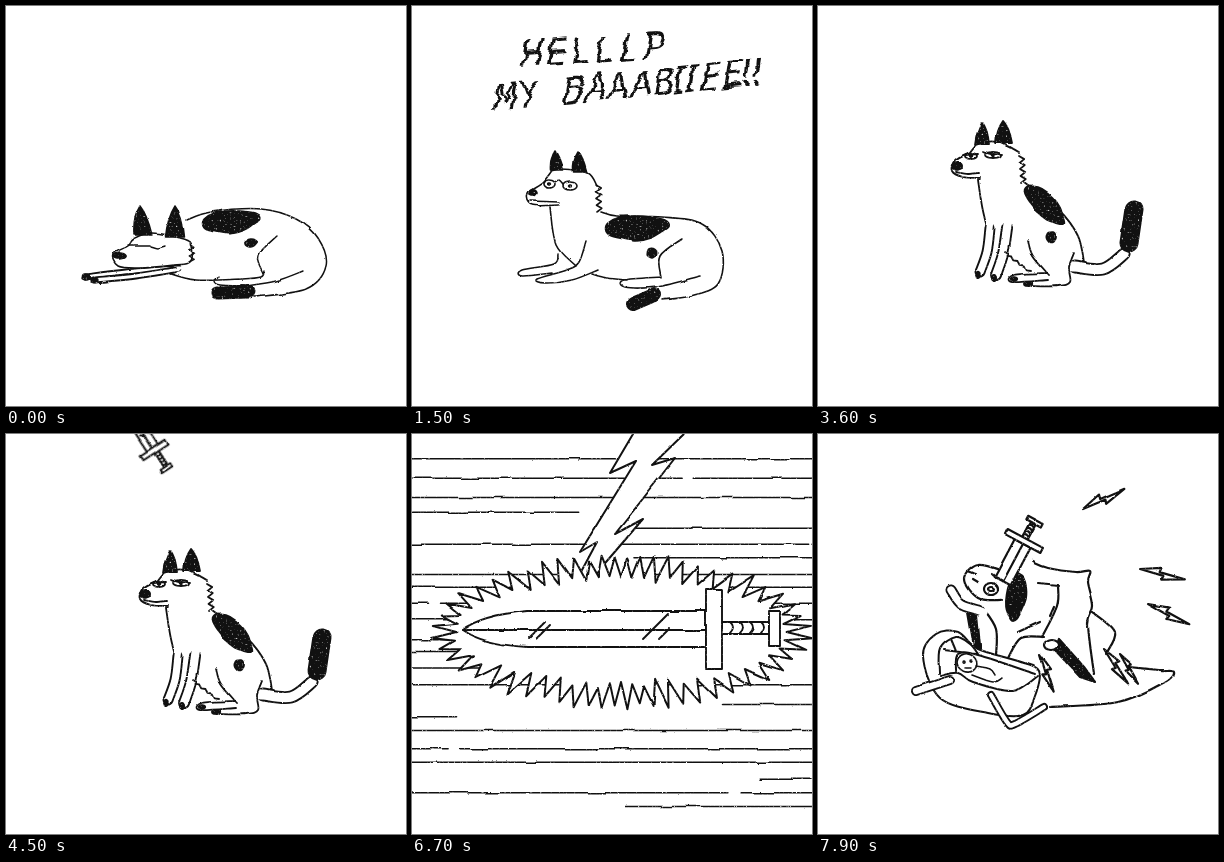
These frames come from a looping animation (400x400 px, 8 s). An HTML page:

```html
<!DOCTYPE html>
<html lang="en">
<head>
<meta charset="utf-8">
<title>Dog and sword</title>
<style>
html, body { margin: 0; width: 100%; height: 100%; overflow: hidden; background: #fff; }
svg { display: block; width: 100vw; height: 100vh; }
path { stroke: #111; stroke-linecap: round; stroke-linejoin: round; fill: none; vector-effect: non-scaling-stroke; }
.white { fill: #fff; }
.black { fill: #111; }
.gap { stroke: #fff; }
text { font: italic 38px "Noto Sans Mono", monospace; fill: #111; }
.thin { font-family: "Noto Sans", sans-serif; }
</style>
</head>
<body>
<svg viewBox="0 0 400 400">
  <defs id="filters"></defs>
  <g id="boil" filter="url(#crayon)"></g>
  <g id="hold" filter="url(#still)"></g>
  <g id="shout" filter="url(#wave)">
    <text transform="translate(107 62) rotate(-4)" letter-spacing="1.6">HELLLP</text>
    <text transform="translate(80 105) rotate(-5.5)">MY BAAAB<tspan class="thin">II</tspan>EE<tspan class="thin">!!</tspan></text>
  </g>
</svg>
<script>
const $ = id => document.getElementById(id);
const rnd = n => { const x = Math.sin(n * 127.1) * 43758.5453; return x - Math.floor(x); };
const points = s => s.split(' ').map(p => p.split(',').map(Number));
const range = (n, f) => Array.from({ length: n }, (_, i) => f(i));

// Smooth path through points
function curve(p, closed) {
  const n = p.length;
  const at = i => closed ? p[(i + n) % n] : p[Math.max(0, Math.min(n - 1, i))];
  return 'M' + p[0] + range(closed ? n : n - 1, i => {
    const [a, b, c, e] = [at(i - 1), at(i), at(i + 1), at(i + 2)];
    const c1 = b.map((v, k) => (v + (c[k] - a[k]) / 6).toFixed(1));
    const c2 = c.map((v, k) => (v - (e[k] - b[k]) / 6).toFixed(1));
    return `C${c1} ${c2} ${c}`;
  }).join('') + (closed ? 'Z' : '');
}

const path = (cls, d, width) => `<path class="${cls}" d="${d}"${width ? ` stroke-width="${width}"` : ''}/>`;
const line = s => path('', s.split(' / ').map(t => curve(points(t))).join(''));
const open = s => path('white', curve(points(s)));
const shape = s => path('white', curve(points(s), true));
const mass = s => path('black', `M${s}Z`);
const thick = (s, width) => path('', curve(points(s)), width);
const box = (x, y, w, h) => path('white', `M${x},${y}h${w}v${h}h${-w}Z`);
const group = (id, width, ...parts) => `<g id="${id}" stroke-width="${width}">${parts.join('')}</g>`;
const place = (transform, ...parts) => `<g transform="${transform}">${parts.join('')}</g>`;

// Slightly uneven ellipse
function spot(x, y, rx, ry, turn = 0, cls = 'black') {
  const c = Math.cos(turn), s = Math.sin(turn);
  return path(cls, curve(range(12, i => {
    const a = i * Math.PI / 6, r = cls === 'black' ? .92 + .2 * rnd(x + i) : 1;
    const u = rx * r * Math.cos(a), v = ry * r * Math.sin(a);
    return [x + u * c - v * s, y + u * s + v * c];
  }), true));
}
const eye = (x, y, w, h, turn) => spot(x, y, w, h, turn, 'white') + spot(x, y, 1.3, 1);
const ear = (x, y, w, h, lean) =>
  path('black', `M${x - w / 2},${y}Q${x + lean - w * .4},${y - h * .6} ${x + lean},${y - h}Q${x + w * .4 + lean},${y - h * .7} ${x + w / 2},${y}Z`);

// Zigzag fur, teeth to the left-hand side of travel
function fur(x1, y1, x2, y2, teeth, depth) {
  const dx = x2 - x1, dy = y2 - y1, len = Math.hypot(dx, dy);
  return path('', 'M' + range(teeth * 2 + 1, i => {
    const t = i / teeth / 2, k = i % 2 * depth / len;
    return [x1 + dx * t + dy * k, y1 + dy * t - dx * k];
  }).join('L'));
}

// Outlined tube; an attached one is left open where it starts
function limb(s, w, attached = true) {
  const p = points(s), [a, b] = p, len = Math.hypot(a[0] - b[0], a[1] - b[1]);
  const root = a.map((v, k) => v + (v - b[k]) / len * (w / 2 + 1));
  return path('', curve(p), w) + path('gap', curve(attached ? [root, ...p] : p), w - 3.8);
}

const bolt = (x, y, len, angle) =>
  place(`translate(${x} ${y}) rotate(${angle}) scale(${len})`, path('white', 'M0,0L.45,-.13 .43,-.03 1,0 .5,.12 .53,.03Z'));

// Guard at 0,0 and blade to the left
function sword(length, tip) {
  const glint = (x, h) => path('', `M${x},${10}L${x + h},${10 - h}`);
  return path('white', `M-8,-18H${tip - length}Q${-length + tip * .3},-14 ${-length},1Q${-length + tip * .3},15 ${tip - length},18H-8Z`)
    + path('', `M${-length},1H-8`)
    + (tip ? glint(-186, 17) + glint(-178, 14) + glint(-71, 25) + glint(-55, 11) : '')
    + box(8, -7, 47, 12)
    + range(4, i => path('', `M${16 + i * 10},-7q6,5 0,11`)).join('')
    + box(-8, -40, 16, 80) + box(55, -18, 11, 35);
}

function makeFilter(id, freq, scale) {
  return `<filter id="${id}" filterUnits="userSpaceOnUse" x="0" y="0" width="400" height="400" color-interpolation-filters="sRGB">
    <feTurbulence type="fractalNoise" baseFrequency="${freq}" numOctaves="2" seed="2" result="slow"/>
    <feDisplacementMap in="SourceGraphic" in2="slow" scale="${scale}" xChannelSelector="R" yChannelSelector="G" result="bent"/>
    <feTurbulence type="fractalNoise" baseFrequency=".5" numOctaves="2" seed="5" result="fine"/>
    <feDisplacementMap in="bent" in2="fine" scale="2" xChannelSelector="R" yChannelSelector="G" result="rough"/>
    <feColorMatrix in="fine" values="0 0 0 0 0  0 0 0 0 0  0 0 0 0 0  0 0 4 0 -.4" result="grain"/>
    <feComposite in="rough" in2="grain" operator="in"/>
  </filter>`;
}
$('filters').innerHTML = makeFilter('crayon', '.03', 3) + makeFilter('still', '.03', 2) + makeFilter('wave', '.02 .09', 10);

const nap = group('nap', 1.5,
  line('181,214 205,206 255,203 290,213 312,232 320,260 300,283 248,291 / 240,280 270,275 297,265'),
  line('162,267 190,274 235,273 255,271 258,265 / 240,280 214,279 208,275 213,270 / 271,230 252,250 257,268'),
  thick('211,287 243,286', 13),
  spot(224, 216, 28, 11, -.1), spot(245, 237, 6, 3.5, -.2),
  limb('172,262 120,266 79,271', 7), limb('168,264 130,270 88,274', 7),
  spot(79, 271, 4, 3), spot(88, 274, 4, 2.5),
  shape('121,240 127,233 146,227 178,233 186,240 184,256 168,259 133,262 112,260 107,248'),
  fur(184, 238, 183, 256, 3, 5),
  ear(137, 229, 18, 29, -3), ear(169, 231, 19, 31, 0),
  spot(113, 250, 6, 3),
  line('121,239 144,239 / 145,240 152,242 159,240'));

const wake = group('wake', 1.6,
  line('189,206 205,210 250,211 290,218 310,245 306,278 278,290 250,294 / 138,201 144,238 164,260'),
  line('174,235 167,256 155,264 125,273 133,277 160,274 186,264 / 146,248 142,258 110,264 110,270 140,267'),
  line('180,268 195,272 215,274 / 249,271 212,274 213,281 245,281 288,270 / 270,233 248,250 249,272'),
  thick('221,298 242,289', 14),
  spot(224, 222, 31, 12, -.05), spot(240, 247, 5, 4.5),
  line('139,165 150,163 175,167 184,180 / 139,166 130,177 115,188 120,199 147,199 / 118,195 147,196'),
  fur(183, 179, 185, 206, 4, 5),
  ear(145, 164, 13, 20, -2), ear(168, 166, 13, 20, -2),
  spot(120, 187, 4, 3),
  eye(137, 178, 6, 4), eye(158, 179, 7, 4), line('143,176 147,174 151,178'));

// Hind part shared by both upright poses
const rump = (tip, patch) =>
  line('206,177 240,203 260,230 266,257') + limb('257,261 285,263 306,248', 13) + thick(tip, 19) + patch
  + spot(233, 231, 5, 5) + line('256,248 251,262 252,276 240,280 210,280 / 230,267 196,269 194,276 230,274')
  + spot(196, 273, 3, 2) + spot(210, 278, 4, 2);

const sit = group('sit', 1.8,
  rump('311,237 316,203', spot(227, 199, 25, 10, .78)),
  line('160,173 164,200 169,222 / 210,235 215,250 231,269'),
  limb('172,222 169,246 162,266', 11), limb('189,222 185,248 178,269', 12),
  spot(160, 269, 2, 3), spot(176, 272, 2, 3),
  fur(213, 264, 188, 246, 4, 2),
  line('152,146 160,138 180,136 201,146 / 152,146 137,154 134,165 145,171 162,172 / 138,166 150,168 161,167'),
  fur(201, 149, 203, 177, 4, 5),
  ear(164, 138, 14, 22, 0), ear(186, 137, 16, 22, -1),
  spot(139, 160, 5, 4), eye(153, 150, 6, 3), eye(175, 150, 8, 3),
  line('147,149 160,148 / 165,146 173,149 184,149'));

const paw = group('paw', 1.8,
  rump('309,238 318,206', spot(226, 202, 20, 11, .9)),
  line('161,177 159,186 168,203 / 187,232 210,260 231,271 / 222,238 217,250 226,262'),
  limb('182,224 170,250 158,271', 11), spot(157, 273, 4, 2),
  limb('195,207 160,213 143,222', 11),
  line('152,146 160,140 177,138 204,148 / 152,146 142,157 152,170 175,175 / 155,172 165,176 175,171'),
  fur(203, 148, 203, 175, 4, 5),
  ear(171, 139, 13, 18, 3), ear(190, 142, 17, 21, 11),
  spot(154, 168, 4, 3), eye(156, 150, 6, 3), eye(173, 151, 7, 3),
  line('150,149 162,149 / 164,146 171,149 181,149'));

const witch = group('witch', 2.2,
  line('203,130 213,123 228,122 237,130 / 270,165 287,167 300,190 294,213 276,228'),
  line('190,222 192,212 203,206 218,207 / 231,223 229,235 237,248 / 292,212 295,224 289,235 / 296,226 307,231 296,239'),
  line('303,232 322,230 347,235 366,242 336,262 310,270 230,273 / 182,188 185,198 193,205 / 210,188 223,182'),
  spot(206, 156, 30, 14, -1.1),
  open('235,131 298,117 293,134 266,175 246,221 238,180 241,155'),
  mass('241,154 251,148 249,175 241,208 238,180'),
  line('251,150 268,151 284,151 / 291,120 298,123'),
  limb('242,170 230,176 220,180', 8),
  open('160,153 147,161 155,185 165,211 183,188'),
  mass('147,161 159,153 162,172 167,190 165,211'),
  limb('158,179 148,173 141,170', 7),
  shape('163,152 166,131 182,125 202,136 196,156 187,176 172,178'),
  fur(167, 130, 197, 124, 6, 6),
  line('164,144 174,149 / 183,152 190,146 199,145 / 170,172 179,166 187,164'),
  eye(171, 152, 6, 3, .2), eye(191, 150, 7, 3, -.3),
  spot(182, 161, 4, 2, 0, 'white'),
  limb('183,171 174,185', 7, false));

const stab = group('stab', 2.2,
  line('215,128 230,134 258,138 272,137 270,148 275,172 270,190 276,240 / 275,178 297,198 288,220'),
  line('240,150 239,172 224,203 / 220,149 241,151 / 190,224 203,204 226,203 / 200,198 222,188 / 232,182 236,173'),
  line('312,233 341,236 356,237 345,249 300,268 232,273 / 165,174 178,195 178,222 / 162,222 188,224'),
  spot(198, 162, 24, 9, -1.4),
  mass('241,205 266,233 277,248 262,243 237,216'), spot(234, 211, 7, 5, 0, 'white'),
  mass('150,178 159,182 163,222 157,218'),
  limb('160,176 143,170 133,156', 11),
  open('184,166 160,164 147,145 160,131 188,138'),
  line('150,137 158,140 / 155,145 160,148 / 174,140 178,144'),
  place('translate(206 107) rotate(-62) scale(.36 .5)', sword(126, 0)),
  spot(173, 155, 7, 6, 0, 'white'), spot(173, 155, 3, 2, 0, 'white'),
  bolt(222, 220, 40, 70), bolt(286, 215, 42, 55), bolt(302, 220, 34, 58),
  range(3, i => `<g class="spark"></g>`).join(''));

const flight = group('flight', 2,
  '<path id="speed" stroke-width="1.5"/>',
  `<g id="lightning">${path('white', 'M221,0 198,39 224,27 168,118 185,108 163,149H176L231,85 203,100 263,24 240,31 272,0')}</g>`,
  '<path id="spikes" class="white"/>');

$('boil').innerHTML = nap + wake + sit + paw + witch + stab + flight + group('sword', 1.9, sword(252, 65));

$('hold').innerHTML = group('cradle', 2,
  shape('105,222 118,200 140,198 160,215 200,227 221,237 217,262 205,281 170,279 122,264'),
  line('121,240 122,215 138,203 152,210 160,220 / 126,216 158,220 / 133,205 138,217 / 138,237 140,220 160,221 217,240'),
  line('122,242 140,239 155,248 195,257 220,242'),
  limb('98,257 132,246', 10, false), limb('173,261 189,288 197,290 226,273', 8, false)) +
  group('asleep', 1.6,
    spot(153, 232, 7, 6, 0, 'white'), spot(152, 229, 5, 3),
    line('158,238 170,235 187,240 / 160,242 186,246 / 166,240 182,243')) +
  group('awake', 1.6,
    spot(149, 229, 10, 9, .4, 'white'), spot(146, 228, 1, 1), spot(153, 227, 1, 1),
    line('147,234 153,234 / 158,232 172,235 177,241 / 154,241 175,248 184,244'));

const cuts = [[0, 'nap'], [8, 'wake'], [22, 'witch'], [33, 'sit'], [48, 'paw'], [60, 'flight'], [71, 'witch'], [75, 'stab']];
const poses = [...new Set(cuts.map(c => c[1]))];

// Guard x, y and angle while the sword drops, is held, thrown and strikes
function swordPose(step) {
  if (step >= 44 && step < 48) return [148, 16 + 63 * (step - 45), 57];
  if (step >= 48 && step < 54) return [143, 212, 57 * (1 - ((step - 48) / 5) ** 2)];
  if (step >= 54 && step < 56) return [143 - 45 * (step - 53) ** 2, 212, 0];
  if (step >= 73 && step < 75) return [206 + 80 * (75 - step), 107 - 25 * (75 - step), -42];
}

function drawFlight(step) {
  const k = step % 3;
  $('speed').setAttribute('d', range(23, i => {
    const y = 24 + i * 15.7 + rnd(i) * 8 + rnd(i + k * 50) * 4;
    const gap = 400 * rnd(i * 7 + k * 31), kind = rnd(i * 5);
    if (kind < .3) return `M0,${y}H400`;
    if (kind < .55) return `M0,${y}H${gap}M${gap + 12},${y}H400`;
    return kind < .8 ? `M${gap},${y}H400` : `M0,${y}H${gap}`;
  }).join(''));
  const n = 112;
  $('spikes').setAttribute('d', 'M' + range(n, i => {
    const t = i / n * 2 * Math.PI, a = t + .2 * Math.sin(2 * t);
    const r = (i % 2 ? 22 : 0) + rnd(i + k * 200) * 8 - 4;
    return [209 + Math.cos(a) * (166 + r), 198 + Math.sin(a) * (53 + r)].map(v => v.toFixed(1));
  }).join('L') + 'Z');
  show('spikes', step >= 65);
  show('lightning', step >= 64);
}

function drawSparks(step) {
  const reach = Math.max(0, (step - 74) / 5);
  document.querySelectorAll('.spark').forEach((el, i) => {
    const x = 215 + (i ? 107 + 8 * (i - 1) : 50) * reach;
    const y = 125 + (i ? 10 + 35 * (i - 1) : -50) * reach;
    el.innerHTML = bolt(x, y, 46, -26 + i * 39 - (i > 1 ? 26 : 0));
  });
}

function show(id, on) { $(id).style.display = on ? '' : 'none'; }

function draw(step) {
  const pose = cuts.filter(c => c[0] <= step).pop()[1];
  poses.forEach(id => show(id, id === pose));
  show('shout', step >= 6 && step < 22);
  show('cradle', pose === 'witch' || pose === 'stab');
  show('asleep', pose === 'witch');
  show('awake', pose === 'stab');

  $('wake').setAttribute('transform', `translate(0 ${-7 * Math.max(0, 10 - step)})`);

  const flying = pose === 'flight', at = swordPose(step);
  show('sword', flying || at);
  if (flying) {
    drawFlight(step);
    $('sword').setAttribute('transform', `translate(302 ${194 + step % 3})`);
  } else if (at) {
    $('sword').setAttribute('transform', `translate(${at[0]} ${at[1]}) rotate(${at[2]}) scale(.36)`);
  }
  if (pose === 'stab') drawSparks(step);

  for (const id of ['crayon', 'wave']) {
    document.querySelectorAll(`#${id} feTurbulence`).forEach((t, i) => t.setAttribute('seed', 2 + step % 3 * 4 + i * 3));
  }
}

let last = -1;
function tick() {
  const step = Math.floor(performance.now() / 100) % 80;
  if (step !== last) draw(last = step);
  requestAnimationFrame(tick);
}
tick();
</script>
</body>
</html>
```
